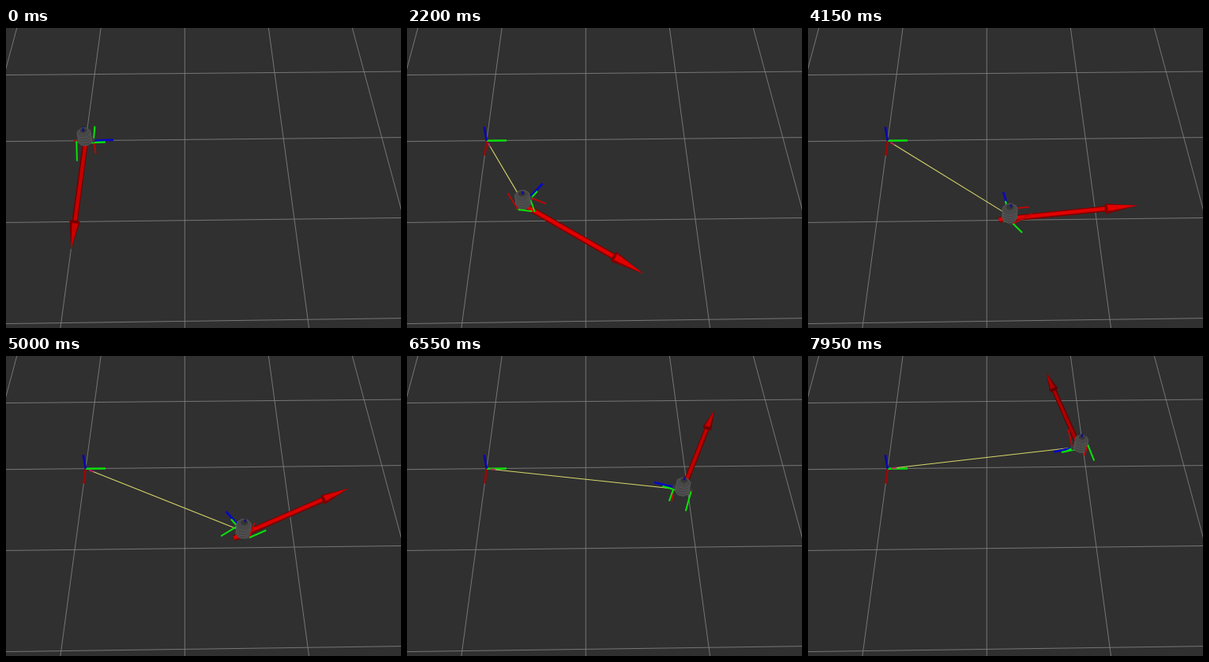
Write an HTML page with a canvas that moves like this. It is 500 by 380 pixels and loops after 8000 ms.

```html
<!DOCTYPE html>
<html>
<head>
<meta charset="utf-8">
<style>
  html, body { margin: 0; width: 100%; height: 100%; overflow: hidden; background: #303030; }
  canvas { display: block; width: 500px; height: 380px; }
</style>
</head>
<body>
<canvas id="stage" width="500" height="380"></canvas>
<script>
const ctx = document.getElementById('stage').getContext('2d');
const RAD = Math.PI / 180;
const LOOP = 8000, STEP = 50;
const AXIS = 0.2;            // length of the frame axes, metres
const ARROW_STEP = 6.88;     // the arrow refreshes after this much turning, degrees
const RED = '#b80808', GREEN = '#0be00b', BLUE = '#0808c0';

// World: x towards the viewer, y to the right, z up, in metres.
function project([x, y, z = 0]) {
  const v = y - 1;
  const w = 1 - 0.0992 * x + 0.002 * v - 0.12 * z;
  return [226.3 + 125.2 * v / w, (141.4 + 78.16 * x - v - 102 * z) / w, w];
}

const along = (p, dir, d) => p.map((c, i) => c + dir[i] * d);

function trace(points, closed) {
  ctx.beginPath();
  points.forEach(([x, y]) => ctx.lineTo(x, y));
  if (closed) ctx.closePath();
}

function line(a, b, color, width) {
  trace([project(a), project(b)]);
  ctx.strokeStyle = color;
  ctx.lineWidth = width;
  ctx.stroke();
}

function fill(points, color) {
  trace(points, true);
  ctx.fillStyle = color;
  ctx.fill();
}

// Pose on a circle of radius 1 m that starts at the fixed frame.
function poseAt(degrees) {
  const s = Math.sin(degrees * RAD), c = Math.cos(degrees * RAD);
  return { pos: [s, 1 - c, 0], fwd: [c, s, 0], left: [-s, c, 0] };
}

function drawGrid() {
  for (let i = -3; i <= 4; i++) {
    line([-3, i, 0], [4, i, 0], '#7e7e7e', 0.9);
    line([i, -3, 0], [i, 5, 0], '#7e7e7e', 0.9);
  }
}

function drawFixedFrame() {
  const o = [0, 0, 0];
  line(o, [AXIS, 0, 0], '#980808', 2.8);
  line(o, [0, AXIS, 0], GREEN, 2.5);
  line(o, [0, 0, AXIS], '#0808a8', 2.8);
}

function drawLink(pos) {
  const dist = Math.hypot(pos[0], pos[1]);
  if (dist < 0.1) return;
  const dir = pos.map(c => c / dist);
  const base = [pos[0], pos[1], 0.025];
  const neck = along([0, 0, 0], dir, 0.09);
  line(neck, base, '#d6d66a', 1.1);
  line(along([0, 0, 0], dir, 0.04), neck, '#c02860', 2);
}

function drawArrow(degrees) {
  const { pos, fwd } = poseAt(degrees);
  const tail = project(pos), neck = project(along(pos, fwd, 1)), tip = project(along(pos, fwd, 1.3));
  const len = Math.hypot(tip[0] - tail[0], tip[1] - tail[1]);
  const nx = (tail[1] - tip[1]) / len, ny = (tip[0] - tail[0]) / len;
  const side = (p, r) => [p[0] + nx * r * 125 / p[2], p[1] + ny * r * 125 / p[2]];
  const level = 190 + 38 * Math.cos((degrees - 75) * RAD);
  const bright = `rgb(${level},0,0)`, dark = `rgb(${level * 0.58},0,0)`;

  fill([side(tail, -0.027), side(neck, -0.027), side(neck, 0.027), side(tail, 0.027)], dark);
  fill([side(tail, -0.018), side(neck, -0.018), side(neck, 0.014), side(tail, 0.014)], bright);
  fill([side(neck, -0.048), tip, side(neck, 0.048)], dark);
  fill([side(neck, -0.036), tip, side(neck, 0.024)], bright);
  // back face of the head
  ctx.beginPath();
  ctx.ellipse(neck[0], neck[1], 0.048 * 125 / neck[2], 2, Math.atan2(ny, nx), 0, 7);
  ctx.fillStyle = dark;
  ctx.fill();
}

// Axes in the plane of a wheel turned by spin degrees.
function drawWheelAxes(hub, fwd, spin) {
  const s = Math.sin(spin * RAD), c = Math.cos(spin * RAD);
  line(hub, along(hub, [fwd[0] * c, fwd[1] * c, -s], AXIS), RED, 2);
  line(hub, along(hub, [-fwd[0] * s, -fwd[1] * s, -c], AXIS), GREEN, 2);
}

function disc(center, z, r, turn, face, edge) {
  const pts = [];
  for (let i = 0; i < 8; i++) {
    const a = (turn + 22.5 + i * 45) * RAD;
    pts.push(project([center[0] + r * Math.cos(a), center[1] + r * Math.sin(a), z]));
  }
  fill(pts, face);
  ctx.strokeStyle = edge;
  ctx.lineWidth = 1;
  ctx.stroke();
}

function drawBody({ pos, fwd, left }, degrees) {
  const center = along(pos, fwd, -0.01);
  for (const s of [-1, 1]) {
    const hub = along([pos[0], pos[1], 0.035], left, s * 0.075);
    line(along(hub, fwd, -0.028), along(hub, fwd, 0.028), '#3c3c3c', 6);
  }
  for (let i = 0; i < 7; i++) {
    const plate = i % 2 === 0;
    disc(center, 0.02 + i * 0.019, plate ? 0.07 : 0.06, degrees,
      plate ? '#484848' : '#3a3a3a', plate ? '#575757' : '#424242');
  }
  for (let z = 0.14; z < 0.18; z += 0.01) disc(center, z, 0.038, degrees, '#363636', '#4c4c4c');
}

function draw(ms) {
  const t = ms / 1000;
  const heading = 1.7 + 24.3 * t;
  const pose = poseAt(heading), { pos, fwd, left } = pose;
  const hub = s => along([pos[0], pos[1], 0.03], left, s * 0.085);

  ctx.fillStyle = '#303030';
  ctx.fillRect(0, 0, 500, 380);
  drawGrid();
  drawFixedFrame();
  drawLink(pos);
  drawArrow(Math.floor(heading / ARROW_STEP) * ARROW_STEP);

  line(hub(1), along(hub(1), left, AXIS), BLUE, 2.8);
  drawWheelAxes(hub(1), fwd, 90 + 935 * t);
  line(pos, along(pos, left, AXIS), GREEN, 2.2);
  drawBody(pose, heading);
  drawWheelAxes(hub(-1), fwd, -50 + 786 * t);
  line([pos[0], pos[1], 0.165], [pos[0], pos[1], 0.21], '#10108c', 2.5);
}

function tick(now) {
  draw(Math.floor((now % LOOP) / STEP) * STEP);
  requestAnimationFrame(tick);
}
draw(0);
requestAnimationFrame(tick);
</script>
</body>
</html>
```
